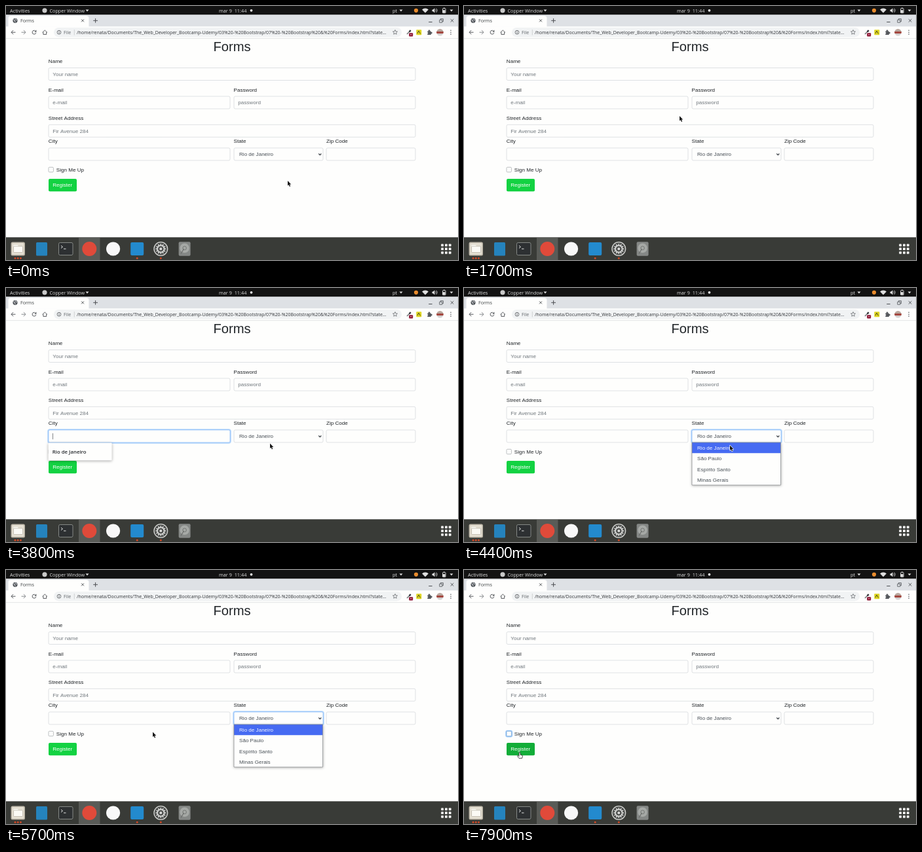
These frames come from a looping animation (690 by 388 pixels, 8 s). An HTML page with a canvas:

```html
<!DOCTYPE html>
<html lang="en">
<head>
<meta charset="utf-8">
<title>Forms</title>
<style>
  html, body { margin: 0; width: 100%; height: 100%; overflow: hidden; background: #fefefd; }
  canvas { display: block; width: 690px; height: 388px; }
</style>
</head>
<body>
<canvas id="stage"></canvas>
<script>
const W = 690, H = 388, LOOP = 8000;
const canvas = document.getElementById('stage');
const ctx = canvas.getContext('2d');
const ratio = window.devicePixelRatio || 1;
canvas.width = W * ratio;
canvas.height = H * ratio;

const SANS = '"Liberation Sans", sans-serif';
const UI = '"Open Sans", sans-serif';
const STATES = ['Rio de Janeiro', 'São Paulo', 'Espírito Santo', 'Minas Gerais'];
const ITEM_H = 16.25;

const fields = {
  name: { x: 65, y: 94.5, w: 560, hint: 'Your name' },
  email: { x: 65, y: 138, w: 277, hint: 'e-mail' },
  password: { x: 348, y: 138, w: 277, hint: 'password' },
  street: { x: 65, y: 181.3, w: 560, hint: 'Fir Avenue 284' },
  city: { x: 65, y: 216.9, w: 277, hint: '' },
  zip: { x: 489, y: 216.9, w: 136, hint: '' }
};
const FIELD_H = 19;
const select = { x: 348, y: 216.9, w: 136 };
const popup = { x: 348, y: 236, w: 135.5, h: 65 };
const button = { x: 65, y: 264, w: 43, h: 19.2 };

// Pointer stops: time, x, y
const path = [
  [0, 430, 267], [750, 430, 267], [1650, 329, 168], [1700, 329, 168],
  [2200, 98, 174], [2400, 98, 174], [3150, 88, 220], [3350, 88, 220],
  [3780, 403, 237.5], [3830, 403, 237.5], [4050, 406, 228], [4250, 406, 228],
  [4750, 406, 285], [5150, 406, 285], [5650, 224, 247.5], [5950, 224, 247.5],
  [6450, 67, 251.5], [7150, 67, 251.5], [7650, 85, 279], [8000, 85, 279]
];

function pointerAt(t) {
  const i = Math.max(1, path.findIndex(p => p[0] > t));
  const [t0, x0, y0] = path[i - 1], [t1, x1, y1] = path[i];
  const u = (t - t0) / (t1 - t0), e = u * u * (3 - 2 * u);
  return { x: x0 + (x1 - x0) * e, y: y0 + (y1 - y0) * e };
}

const within = (t, a, b) => t >= a && t < b;
const inside = (p, r, h = r.h) => p.x >= r.x && p.x <= r.x + r.w && p.y >= r.y && p.y <= r.y + h;

function rect(x, y, w, h, fill) {
  ctx.fillStyle = fill;
  ctx.fillRect(x, y, w, h);
}

function round(x, y, w, h, r, fill, stroke, lw = 0.6) {
  ctx.beginPath();
  ctx.roundRect(x, y, w, h, r);
  if (fill) { ctx.fillStyle = fill; ctx.fill(); }
  if (stroke) { ctx.strokeStyle = stroke; ctx.lineWidth = lw; ctx.stroke(); }
}

function disc(x, y, r, fill) {
  ctx.beginPath();
  ctx.arc(x, y, r, 0, Math.PI * 2);
  ctx.fillStyle = fill;
  ctx.fill();
}

function ring(x, y, r, color, lw = 1, from = 0, to = Math.PI * 2) {
  ctx.beginPath();
  ctx.arc(x, y, r, from, to);
  ctx.strokeStyle = color;
  ctx.lineWidth = lw;
  ctx.stroke();
}

function line(color, lw, ...pts) {
  ctx.beginPath();
  for (let i = 0; i < pts.length; i += 2) ctx.lineTo(pts[i], pts[i + 1]);
  ctx.strokeStyle = color;
  ctx.lineWidth = lw;
  ctx.stroke();
}

function poly(fill, ...pts) {
  ctx.beginPath();
  for (let i = 0; i < pts.length; i += 2) ctx.lineTo(pts[i], pts[i + 1]);
  ctx.closePath();
  ctx.fillStyle = fill;
  ctx.fill();
}

function text(str, x, y, size = 8.08, color = '#212529', family = SANS, weight = 400) {
  ctx.font = `${weight} ${size}px ${family}`;
  ctx.fillStyle = color;
  ctx.fillText(str, x, y);
}

function shadowed(draw) {
  ctx.save();
  ctx.shadowColor = 'rgba(0,0,0,.35)';
  ctx.shadowBlur = 4 * ratio;
  ctx.shadowOffsetY = ratio;
  draw();
  ctx.restore();
}

const cross = (x, y, r, color) => {
  line(color, 0.9, x - r, y - r, x + r, y + r);
  line(color, 0.9, x - r, y + r, x + r, y - r);
};

function drawTopBar() {
  const ink = '#dedede';
  rect(0, 0, W, 13.5, '#131313');
  text('Activities', 6, 9.6, 7.4, ink, UI);
  disc(59, 6.8, 3.6, '#c9c9c9');
  text('Copper Window', 66.5, 9.6, 7.2, ink, UI);
  poly(ink, 121.5, 5.6, 126.5, 5.6, 124, 8.6);
  text('mar 9  11:44', 325, 9.6, 7.3, ink, UI);
  disc(374.5, 6.8, 1.9, '#eee');
  text('pt', 590, 9.6, 7.4, ink, UI);
  poly(ink, 600.5, 5.6, 605.5, 5.6, 603, 8.6);

  disc(626, 6.8, 3.1, '#e88b2d');
  ctx.beginPath();
  ctx.moveTo(640, 10.5);
  ctx.arc(640, 10.5, 7, -Math.PI * 0.75, -Math.PI * 0.25);
  ctx.fillStyle = ink;
  ctx.fill();
  poly(ink, 650.5, 5.5, 652, 5.5, 654.4, 3.2, 654.4, 10.4, 652, 8.2, 650.5, 8.2);
  ring(654.2, 6.8, 2.2, ink, 0.8, -0.9, 0.9);
  ring(654.2, 6.8, 4, ink, 0.8, -0.9, 0.9);
  round(666.5, 3.7, 4.6, 7, 0.7, null, ink, 0.9);
  rect(667.6, 2.7, 2.4, 1, ink);
  rect(667, 6.2, 3.6, 4, ink);
  poly(ink, 677.5, 5.6, 682.5, 5.6, 680, 8.6);
}

function drawTabs() {
  const ink = '#4a4d51';
  rect(0, 13.5, W, 18, '#dee1e5');
  round(3.5, 15, 123, 18, [4, 4, 0, 0], '#fefefd');
  disc(14, 22.3, 3.6, '#55595e');
  line('#e8eaec', 0.9, 11.3, 21, 13.5, 21.7, 13.3, 23.7, 14.8, 25);
  line('#e8eaec', 0.8, 14.2, 19.3, 15, 21, 17, 21.6);
  text('Forms', 22, 25, 7.1, '#3c4043', UI);
  cross(117, 22.3, 2, ink);
  line(ink, 1, 133.2, 22.3, 140, 22.3);
  line(ink, 1, 136.6, 18.9, 136.6, 25.7);
  line(ink, 1, 645.3, 24.5, 650.6, 24.5);
  round(661.8, 21.2, 4, 4, 0, null, ink, 0.8);
  line(ink, 0.8, 663.3, 21, 663.3, 19.6, 667.4, 19.6, 667.4, 23.7, 666, 23.7);
  cross(681, 22.3, 2.3, ink);
}

function drawToolbar() {
  const ink = '#55585c', cy = 40.2;
  rect(0, 31.5, W, 18.5, '#fefefd');
  rect(0, 49.4, W, 0.7, '#d9dbdd');
  line(ink, 1, 14.5, cy, 8, cy);
  line(ink, 1, 11.1, cy - 3.1, 8, cy, 11.1, cy + 3.1);
  line('#85888b', 1, 23.5, cy, 30, cy);
  line('#85888b', 1, 26.9, cy - 3.1, 30, cy, 26.9, cy + 3.1);
  ring(43, cy, 2.9, ink, 1, 0.2, 5.3);
  poly(ink, 46.4, 36.6, 46.4, 39.8, 43.2, 39.8);
  line(ink, 1, 55.6, 40.5, 59.3, 37, 63, 40.5);
  line(ink, 1, 56.9, 40, 56.9, 43.4, 61.7, 43.4, 61.7, 40);

  round(73, 33, 531, 14.4, 7.2, '#f1f3f4');
  ring(81, cy, 2.9, ink, 0.8);
  rect(80.6, 39.7, 0.9, 2.2, ink);
  rect(80.6, 38.3, 0.9, 0.9, ink);
  text('File', 88, 42.7, 7, '#5f6368', UI);
  line('#b7babd', 0.6, 104.3, 36, 104.3, 44.5);
  text('/home/renata/Documents/The_Web_Developer_Bootcamp-Udemy/03%20-%20Bootstrap/07%20-%20Bootstrap%20&%20Forms/index.html?state…',
    108, 42.7, 6.94, '#303337', UI);

  ctx.beginPath();
  for (let i = 0; i <= 10; i++) {
    const a = -Math.PI / 2 + i * Math.PI / 5, r = i % 2 ? 1.7 : 3.7;
    ctx.lineTo(594 + r * Math.cos(a), cy + r * Math.sin(a));
  }
  ctx.strokeStyle = ink;
  ctx.lineWidth = 0.7;
  ctx.stroke();

  line('#77797d', 1.6, 612, 43, 616, 39);
  line('#33363a', 2.4, 615.6, 39.4, 617.8, 37.2);
  round(615.2, 41.2, 6, 5.2, 1, '#8d1432');
  rect(617, 43.4, 2.4, 0.8, '#f3d8df');
  round(626.3, 36.2, 8, 8, 0.8, '#dfd622');
  line('#4b4b1d', 1, 628, 42, 630, 38, 632.5, 42.3);
  round(643.3, 38.5, 5.6, 5.4, 0.6, ink);
  disc(646, 37.8, 1.4, ink);
  disc(649.3, 41.1, 1.4, ink);
  disc(643.4, 41.2, 1, '#fefefd');

  ctx.save();
  ctx.beginPath();
  ctx.arc(662.5, cy, 5.3, 0, Math.PI * 2);
  ctx.clip();
  rect(657, 34, 12, 6, '#b9a79e');
  rect(657, 39, 12, 3, '#a4473f');
  rect(657, 42, 12, 5, '#d3d1d1');
  ctx.restore();
  for (const y of [37.3, 40.2, 43.1]) disc(679, y, 0.8, ink);
}

function drawDock() {
  rect(0, 353.3, W, 35, '#393b37');
  rect(111, 354, 32.5, 34, '#595b57');

  round(7.5, 360.5, 21.5, 21, 2.5, '#b9b3a5');
  round(9, 362, 18.5, 18, 1.5, '#e4dfd2');
  round(11.5, 365, 7, 4, 1, '#fbfaf5');
  round(11.5, 367, 14, 9.5, 1, '#fbfaf5', '#a9a394');
  round(46, 361, 17, 20.5, 1.5, '#2583bd');
  round(80.5, 361.5, 21.5, 19, 2, '#2d3032', '#858986', 1);
  line('#e2e4e2', 1, 84, 366, 86.5, 368, 84, 370);
  line('#e2e4e2', 1, 88, 371, 91.5, 371);
  disc(127.3, 371, 11, '#e04a3a');
  disc(163.6, 371, 10.6, '#f8f8f8');
  round(190.2, 361, 20, 20, 2, '#238ace');

  disc(236.3, 371, 11, '#d4d5d2');
  disc(236.3, 371, 9.7, '#4c4e4c');
  for (let i = 0; i < 12; i++) {
    const a = i * Math.PI / 6, c = Math.cos(a), s = Math.sin(a);
    line('#dadbd9', 1.6, 236.3 + 5.5 * c, 371 + 5.5 * s, 236.3 + 7.8 * c, 371 + 7.8 * s);
  }
  ring(236.3, 371, 5.2, '#dadbd9', 1.7);
  disc(236.3, 371, 2, '#dadbd9');

  round(263.6, 360.3, 18, 21.5, 2, '#858886');
  disc(272.6, 369.8, 7.2, '#a6a9a6');
  ring(272.6, 369.8, 2.8, '#737673', 1);
  line('#6b6e6b', 1.2, 267, 378.5, 271.5, 371);

  for (const x of [14, 18.2, 22.4, 200.2, 236.3]) disc(x, 385.3, 1.4, '#df4a24');
  for (let i = 0; i < 9; i++) {
    round(664.2 + (i % 3) * 5.8, 363.4 + Math.floor(i / 3) * 5.8, 3.8, 3.8, 0.8, '#f4f4f3');
  }
}

function control(box, focused) {
  if (focused) round(box.x - 0.8, box.y - 0.8, box.w + 1.6, FIELD_H + 1.6, 2.8, null, '#b5d6fb', 1.9);
  round(box.x, box.y, box.w, FIELD_H, 2, '#fefefd', focused ? '#73aef5' : '#c9ced3');
}

function drawForm(t, p) {
  text('Forms', 316.4, 69.2, 20.2);
  text('Name', 64.8, 87);
  text('E-mail', 64.8, 130.5);
  text('Password', 347.6, 130.5);
  text('Street Address', 64.8, 174);
  text('City', 64.8, 209.3);
  text('State', 347.6, 209.3);
  text('Zip Code', 489, 209.3);

  const focus = within(t, 2400, 3350) ? 'street' : within(t, 3350, 4150) ? 'city' : '';
  for (const [key, f] of Object.entries(fields)) {
    control(f, key === focus);
    text(f.hint, f.x + 6.3, f.y + 12.4, 8.08, '#70777d');
  }
  const since = t - (focus === 'street' ? 2400 : 3350);
  if (focus && since % 1000 < 500) rect(71.2, fields[focus].y + 5, 0.6, 9.3, '#33383d');

  control(select, within(t, 4150, 6400));
  text(STATES[0], 356, 229.3, 8.08, '#495057');
  line('#343a40', 1.1, 477.3, 225.5, 479.3, 227.6, 481.3, 225.5);

  const checked = within(t, 6450, 6950);
  if (t >= 6450) {
    round(64.2, 245.6, 9, 9, 2, null, checked ? '#91a0ff' : '#9cc8f8', 1.8);
  }
  round(65, 246.3, 7.4, 7.4, 1.3, checked ? '#3547e2' : '#fefefd', checked ? '#3547e2' : t >= 6950 ? '#6c9ed0' : '#a3a7aa', 0.7);
  if (checked) line('#fff', 1.1, 66.6, 250, 68.2, 251.7, 71, 248);
  text('Sign Me Up', 76.8, 252.6);

  const hover = inside(p, button);
  round(button.x, button.y, button.w, button.h, 2, hover ? '#12ad38' : '#13d242');
  text('Register', 71.2, 276.4, 8.08, '#fff');
}

function drawPopups(t, p) {
  if (within(t, 3350, 4150)) {
    shadowed(() => round(64.6, 236.6, 97, 26.6, 1, '#fefefd'));
    text(STATES[0], 70.8, 252.6, 7.8, '#24282c', UI, 600);
  }
  if (within(t, 4150, 5950)) {
    shadowed(() => rect(popup.x, popup.y, popup.w, popup.h, '#fefefd'));
    const active = inside(p, popup) ? Math.min(3, Math.floor((p.y - popup.y) / ITEM_H)) : 0;
    rect(popup.x, popup.y + active * ITEM_H, popup.w, ITEM_H, '#466bf2');
    STATES.forEach((name, i) =>
      text(name, 356, 247.1 + i * ITEM_H, 8.08, i === active ? '#f4f6ff' : '#495057'));
    round(popup.x, popup.y, popup.w, popup.h, 0, null, '#85888c', 0.7);
  }
}

function drawPointer(t, p) {
  const open = within(t, 4150, 5950);
  ctx.save();
  ctx.translate(p.x, p.y);
  ctx.lineJoin = 'round';
  if (!open && Object.values(fields).some(f => inside(p, f, FIELD_H))) {
    line('#222', 0.8, -1.5, -4, 0, -3.5, 1.5, -4);
    line('#222', 0.8, 0, -3.5, 0, 3.5);
    line('#222', 0.8, -1.5, 4, 0, 3.5, 1.5, 4);
  } else if (inside(p, button)) {
    const hand = new Path2D('M-1 0Q0-1.4 1 0V3.2L3.7 4Q4.6 4.5 4.3 6L3.5 8.7H-1L-3.5 5.4Q-3.5 4.1-2.4 4.5L-1 5.7Z');
    ctx.fillStyle = '#fff';
    ctx.fill(hand);
    ctx.strokeStyle = '#222';
    ctx.lineWidth = 0.8;
    ctx.stroke(hand);
  } else {
    const arrow = new Path2D('M0 0V7.6L1.7 6.1L2.9 8.9L4.2 8.3L3 5.6H5.3Z');
    ctx.strokeStyle = '#fff';
    ctx.lineWidth = 1.2;
    ctx.stroke(arrow);
    ctx.fillStyle = '#161616';
    ctx.fill(arrow);
  }
  ctx.restore();
}

function draw(t) {
  const p = pointerAt(t);
  ctx.setTransform(ratio, 0, 0, ratio, 0, 0);
  rect(0, 0, W, H, '#fefefd');
  drawTopBar();
  drawTabs();
  drawToolbar();
  drawForm(t, p);
  drawPopups(t, p);
  drawDock();
  drawPointer(t, p);
}

const start = performance.now();
function tick() {
  draw((performance.now() - start) % LOOP);
  requestAnimationFrame(tick);
}
tick();
</script>
</body>
</html>
```
